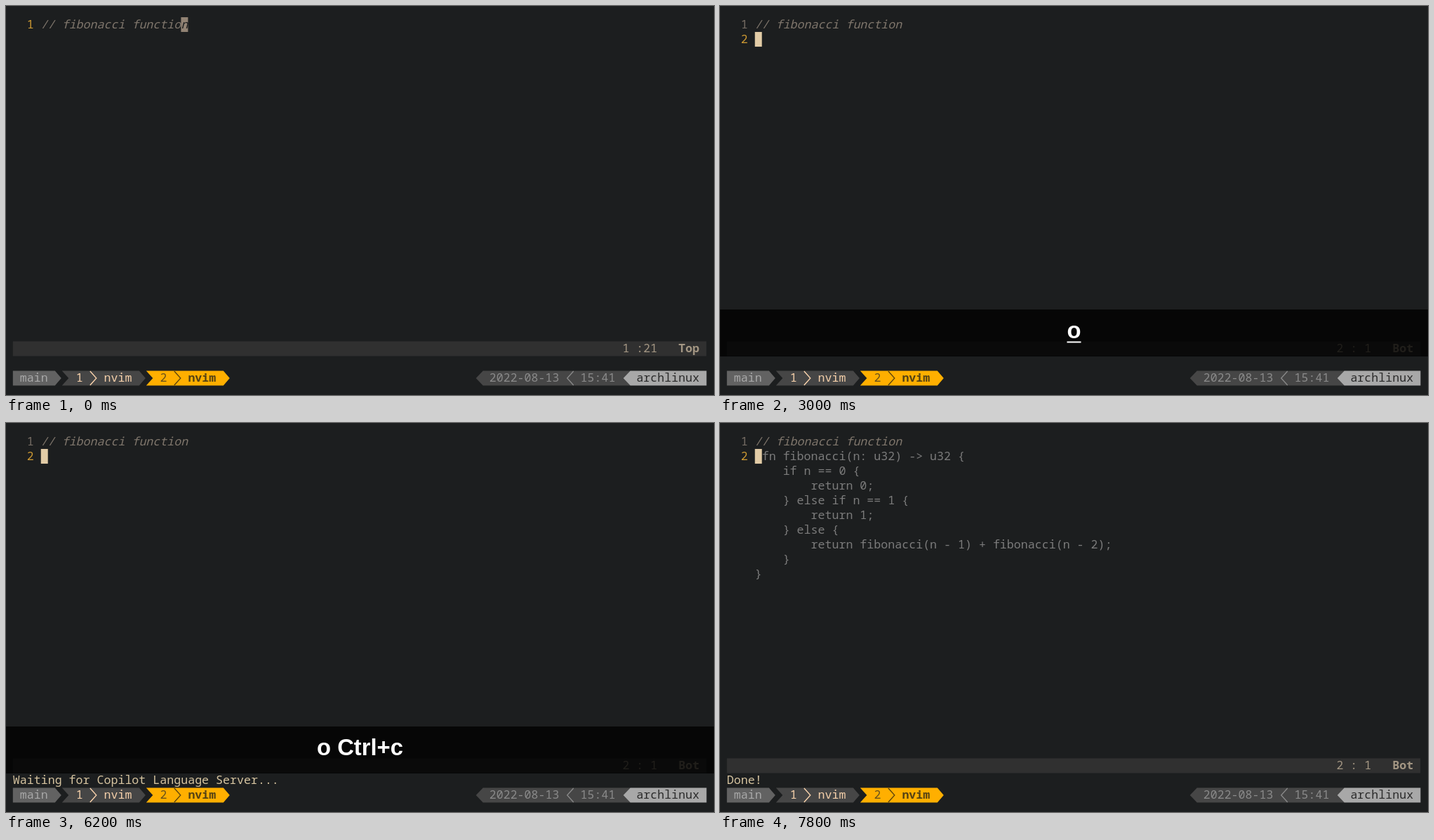
An HTML page that plays this animation: 1009 px wide and 555 px high, repeating every 8000 ms.

```html
<!DOCTYPE html>
<html lang="en">
<head>
<meta charset="utf-8">
<title>Code suggestion in a terminal editor</title>
<style>
  html, body { margin: 0; width: 100%; height: 100%; overflow: hidden; background: #1c1e1f; }
  svg { display: block; width: 100%; height: 100%; }
  text { white-space: pre; font: 16.64px "Noto Sans Mono", monospace; }
  text.bold { font-weight: 700; }
  text.italic { font-style: italic; }
  text.keys { font: 700 32.8px "Liberation Sans", sans-serif; }
</style>
</head>
<body>
<svg id="stage" viewBox="0 0 1009 555"></svg>
<script>
const LOOP = 8000;
const COL = 9.984, ROW = 21.02, LEFT = 9.8, TOP = 16;
const stage = document.getElementById("stage");

const colX = col => LEFT + col * COL;
const rowY = row => TOP + row * ROW;

function add(parent, tag, attrs, content = "") {
  const node = document.createElementNS("http://www.w3.org/2000/svg", tag);
  for (const key in attrs) node.setAttribute(key, attrs[key]);
  node.textContent = content;
  return parent.appendChild(node);
}

const group = () => add(stage, "g", {});
const rect = (parent, x, y, width, height, fill) =>
  add(parent, "rect", { x, y, width, height, fill });
const write = (parent, col, row, content, fill, style = "") =>
  add(parent, "text", { x: colX(col), y: rowY(row) + 16, fill, class: style }, content);
const shape = (parent, d, fill) => add(parent, "path", { d, fill });
const chevron = (parent, d, stroke) =>
  add(parent, "path", { d, stroke, fill: "none", "stroke-width": 1.3 });
const show = (node, on) => node.setAttribute("visibility", on ? "visible" : "hidden");

const colors = {
  comment: "#7f766c", number: "#766d64", current: "#cb9832",
  ghost: "#7b7b7b", text: "#d6c4a0", cursor: "#e2cca6", status: "#a39683"
};

// Editor
rect(stage, 0, 0, 1009, 555, "#1c1e1f");
write(stage, 4, 0, "// fibonacci function", colors.comment, "italic");

const firstLine = group();
write(firstLine, 2, 0, "1", colors.current);
rect(firstLine, colX(24), rowY(0), COL, ROW, "#928374");
write(firstLine, 24, 0, "n", "#1c1e1f", "italic");

const secondLine = group();
write(secondLine, 2, 0, "1", colors.number);
write(secondLine, 2, 1, "2", colors.current);
rect(secondLine, colX(4), rowY(1), COL, ROW, colors.cursor);

const suggestion = group();
[
  " fn fibonacci(n: u32) -> u32 {",
  "    if n == 0 {",
  "        return 0;",
  "    } else if n == 1 {",
  "        return 1;",
  "    } else {",
  "        return fibonacci(n - 1) + fibonacci(n - 2);",
  "    }",
  "}"
].forEach((line, i) => write(suggestion, 4, i + 1, line, colors.ghost));

// Status line and message
rect(stage, LEFT, rowY(22), COL * 99, ROW, "#303030");
const position = write(stage, 87, 22, "", colors.status);
const extent = write(stage, 95, 22, "", colors.status, "bold");
const message = write(stage, 0, 23, "", colors.text);

// Session bar
const bar = add(stage, "g", { transform: `translate(-0.2 ${rowY(24) - 520})` });
shape(bar, "M10 0H70L79 10.5 70 21H10Z", "#626262");
shape(bar, "M80 0H190L199 10.5 190 21H80L89.5 10.5Z", "#464646");
shape(bar, "M200 0H310L319 10.5 310 21H200L209.5 10.5Z", "#ffaf00");
shape(bar, "M680 0H890V21H680L670 10.5Z", "#464646");
shape(bar, "M890 0H998.6V21H890L880 10.5Z", "#a8a8a8");
chevron(bar, "M120 .5L129 10.5 120 20.5", "#ffd7af");
chevron(bar, "M240 .5L249 10.5 240 20.5", "#5c430d");
chevron(bar, "M809 .5L800 10.5 809 20.5", "#8a8a8a");
bar.setAttribute("transform", `translate(-0.2 ${rowY(24)})`);
[
  [1, "main", "#a8a8a8"],
  [9, "1", "#f5d0aa"],
  [13, "nvim", "#f5d0aa"],
  [21, "2", "#66501c"],
  [25, "nvim", "#564313", "bold"],
  [68, "2022-08-13", "#8a8a8a"],
  [81, "15:41", "#8a8a8a"],
  [89, "archlinux", "#2b2b2b"]
].forEach(([col, ...label]) => write(stage, col, 24, ...label));

// Pressed keys
const overlay = group();
add(overlay, "rect", { x: 0, y: 433, width: 1009, height: 67, "fill-opacity": 0.8 });
const keys = add(overlay, "text",
  { x: 504.5, y: 474, fill: "#fff", "text-anchor": "middle", class: "keys" });
const underline = rect(overlay, 0, 478.5, 0, 2, "#fff");

function draw(t) {
  const opened = t >= 3000, left = t >= 4400, done = t >= 6700;
  show(firstLine, !opened);
  show(secondLine, opened);
  show(suggestion, done);
  position.textContent = opened ? "2 : 1" : "1 :21";
  extent.textContent = opened ? "Bot" : "Top";
  message.textContent = done ? "Done!" : left ? "Waiting for Copilot Language Server..." : "";

  const overlayOn = opened && t < 7100;
  show(overlay, overlayOn);
  keys.textContent = left ? "o Ctrl+c" : "o";
  // The latest key is underlined for a moment.
  const fresh = overlayOn && (t < 3100 || (left && t < 4500));
  show(underline, fresh);
  underline.setAttribute("x", left ? 472 : 494.5);
  underline.setAttribute("width", left ? 94 : 20);
}

const start = performance.now();
function tick() {
  draw((performance.now() - start) % LOOP);
  requestAnimationFrame(tick);
}
tick();
</script>
</body>
</html>
```
